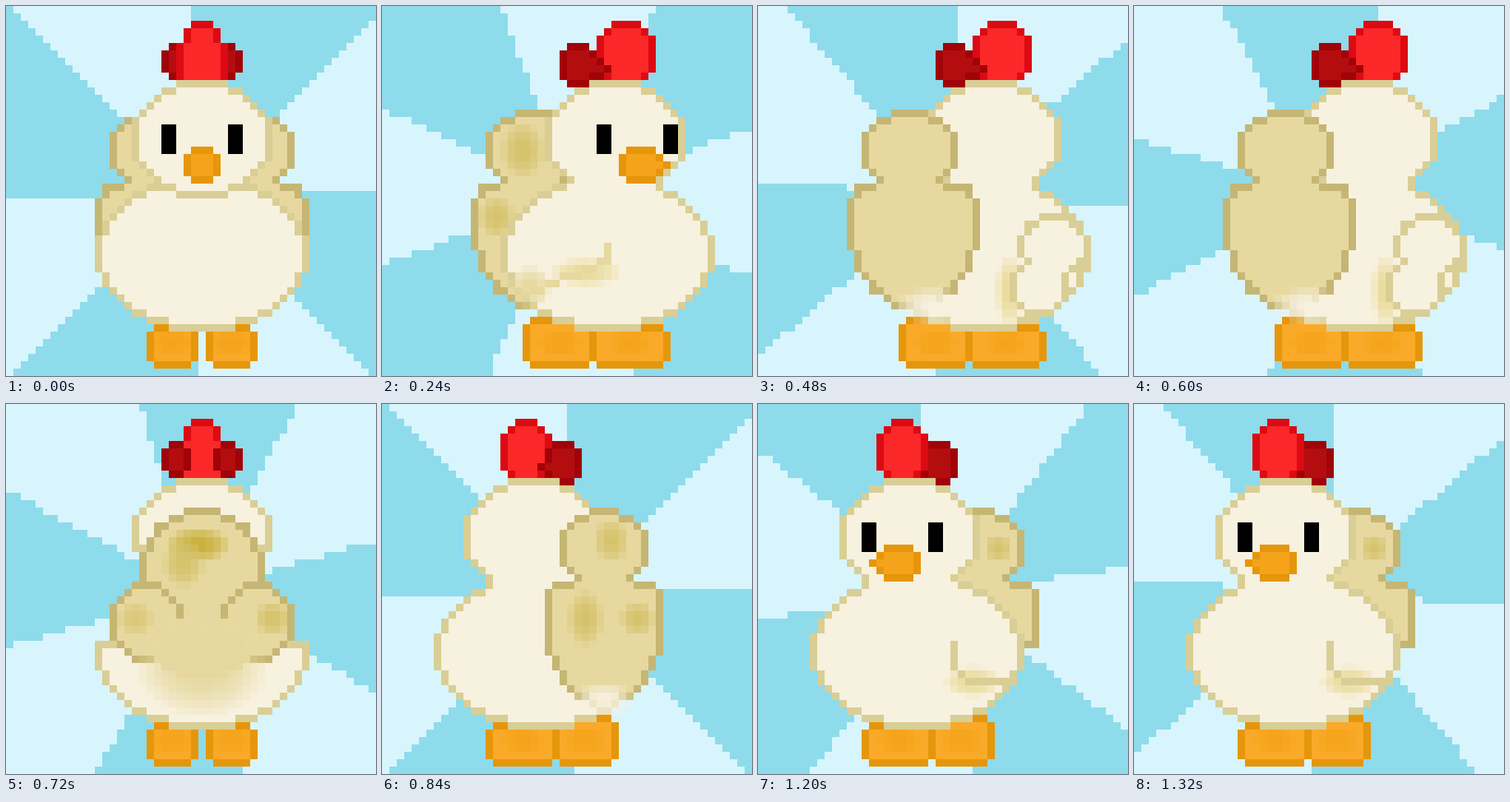
Write an HTML page with a canvas that moves like this. It is 500 px wide and 500 px high and loops after 1440 ms.

```html
<!DOCTYPE html>
<html lang="en">
<head>
<meta charset="utf-8">
<title>Turning hen</title>
<style>
html, body { margin: 0; height: 100%; overflow: hidden; }
canvas { display: block; }
</style>
</head>
<body>
<canvas width="500" height="500"></canvas>
<script>
const ctx = document.querySelector('canvas').getContext('2d');
const CELL = 10, GRID = 50, STEP = 120, STEPS = 12;
const RAY_STEPS = 7, RAY_TURN = 12.3;

const SKY = '#8edbeb', LIGHT = '#d8f5fd';
const CREAM = '#f7f1df', EDGE = '#d9ce95';
const TAN = '#e6d89f', BARK = '#c5b674';
const RED = '#fa2828', RED_EDGE = '#dc0a12', WINE = '#b40d10', WINE_EDGE = '#a00308';
const ORANGE = '#faaa28', BEAK = '#f5a31a', ORANGE_EDGE = '#e6960a';
const OCHRE = '#d6c36c', BUTTER = '#eadb98';

let flip = false;

function cell(x, y, color) {
  ctx.fillStyle = color;
  ctx.fillRect((flip ? 51 - x : x) * CELL, y * CELL, CELL, CELL);
}

// Shapes are tests on a cell. An oval fills the cells from x0,y0 to x1,y1;
// a higher power makes it boxier.
function oval(x0, y0, x1, y1, power = 2) {
  const cx = (x0 + x1) / 2, cy = (y0 + y1) / 2;
  const rx = cx - x0 + 0.5, ry = cy - y0 + 0.5;
  return (x, y) => Math.abs((x - cx) / rx) ** power + Math.abs((y - cy) / ry) ** power <= 1;
}
const any = (...shapes) => (x, y) => shapes.some(s => s(x, y));
const band = (shape, top, bottom = GRID) => (x, y) => y >= top && y <= bottom && shape(x, y);
const mirror = shape => (x, y) => shape(52 - x, y);

// Fills a shape and draws its border cells in the edge colour.
function paint(shape, fill, edge) {
  for (let y = 0; y < GRID; y++)
    for (let x = 0; x < GRID; x++) {
      if (!shape(x, y)) continue;
      const inner = shape(x - 1, y) && shape(x + 1, y) && shape(x, y - 1) && shape(x, y + 1);
      cell(x, y, inner ? fill : edge);
    }
}

// Soft elliptical patch.
function shade(cx, cy, rx, ry, color) {
  for (let y = Math.ceil(cy - ry); y <= cy + ry; y++)
    for (let x = Math.ceil(cx - rx); x <= cx + rx; x++) {
      ctx.globalAlpha = Math.max(0, 1 - ((x - cx) / rx) ** 2 - ((y - cy) / ry) ** 2);
      cell(x, y, color);
    }
  ctx.globalAlpha = 1;
}

function line(color, ...pts) {
  for (let k = 1; k < pts.length; k++) {
    const [x0, y0] = pts[k - 1], [x1, y1] = pts[k];
    const n = Math.max(Math.abs(x1 - x0), Math.abs(y1 - y0));
    for (let i = 0; i <= n; i++)
      cell(Math.round(x0 + (x1 - x0) * i / n), Math.round(y0 + (y1 - y0) * i / n), color);
  }
}

const cream = s => paint(s, CREAM, EDGE);
const tan = s => paint(s, TAN, BARK);
const red = s => paint(s, RED, RED_EDGE);
const wine = s => paint(s, WINE, WINE_EDGE);
const beak = s => paint(s, BEAK, ORANGE_EDGE);

const head = cx => oval(cx - 9, 10, cx + 9, 25);
const body = cx => oval(cx - 14, 23, cx + 14, 43);

function foot(x0, x1, top) {
  paint(oval(x0, top, x1, 48, 4), ORANGE, ORANGE_EDGE);
  shade((x0 + x1) / 2, 45, 3, 2, BEAK);
}

function eyes(...xs) {
  for (const x of xs)
    for (let i = 0; i < 8; i++) cell(x + i % 2, 16 + (i >> 1), '#000');
}

const rightRear = any(oval(14, 14, 26, 24), band(oval(12, 18, 29, 40), 24));
const leftTail = oval(24, 14, 35, 24), leftRump = oval(22, 18, 37, 40);

const rightLobe = any(oval(24, 5, 28, 10), oval(26, 7, 30, 9));
const leftLobe = any(oval(22, 5, 26, 10), oval(21, 7, 24, 9));
const middleCrest = oval(23, 2, 29, 13);
const rightCrest = oval(29, 2, 36, 10);
const leftCrest = oval(16, 2, 22, 10);
const sideLobe = oval(21, 5, 24, 9);
const sideLobes = any(sideLobe, mirror(sideLobe));

function straightFeet() {
  foot(19, 25, 43);
  foot(27, 33, 43);
}

function rightFeet() {
  foot(19, 28, 42);
  foot(28, 38, 43);
}

function leftFeet() {
  foot(23, 31, 42);
  foot(14, 23, 43);
}

function front() {
  straightFeet();
  wine(sideLobes);
  red(middleCrest);
  tan(any(rightRear, mirror(rightRear)));
  cream(body(26));
  cream(head(26));
  eyes(21, 30);
  beak(oval(24, 19, 28, 23));
}

function frontRight() {
  rightFeet();
  red(rightCrest);
  wine(rightLobe);
  tan(rightRear);
  shade(18.5, 19, 3, 4, OCHRE);
  shade(15, 28, 2.5, 3, OCHRE);
  cream(any(head(31), body(30)));
  shade(19.5, 37.5, 3, 3, TAN);
  shade(27, 35.5, 5, 2, BUTTER);
  line(TAN, [30, 32], [30, 34], [25, 36], [20, 38]);
  eyes(29, 38);
  beak(any(oval(32, 19, 37, 23), oval(36, 21, 38, 21)));
}

function backRight() {
  rightFeet();
  red(rightCrest);
  wine(rightLobe);
  cream(any(head(31), body(30)));
  shade(33.5, 38, 2, 5, BUTTER);
  cream(any(oval(35, 28, 44, 36), oval(34, 34, 41, 41)));
  tan(rightRear);
  shade(23, 40, 5, 2.5, CREAM);
}

function back() {
  const wing = oval(14, 24, 23, 34);
  straightFeet();
  red(middleCrest);
  wine(sideLobes);
  cream(band(body(26), 32));
  cream(band(head(26), 0, 19));
  tan(oval(18, 14, 34, 30));
  tan(any(wing, mirror(wing)));
  paint(oval(20, 29, 32, 36), TAN, TAN);
  shade(26, 35, 9, 7, TAN);
  shade(25.5, 18.5, 4.5, 2.5, '#c9b03c');
  shade(23.5, 21, 3, 3.5, OCHRE);
  shade(17, 28.5, 2.5, 2.5, '#dcc87a');
  shade(35.5, 28.5, 2.5, 2.5, OCHRE);
}

function backLeft() {
  leftFeet();
  red(leftCrest);
  wine(leftLobe);
  cream(any(head(20), body(21)));
  tan(any(leftTail, band(leftRump, 24)));
  shade(29.5, 39.5, 4, 2.5, CREAM);
  shade(30.5, 18, 2.5, 3, OCHRE);
  shade(27, 28.5, 2.5, 4, OCHRE);
  shade(34, 28.5, 2.5, 2.5, OCHRE);
}

function left() {
  foot(12, 22, 43);
  foot(22, 31, 43);
  wine(oval(18, 5, 22, 10));
  red(oval(11, 2, 18, 10));
  cream(any(oval(7, 10, 23, 25), oval(4, 24, 24, 39), oval(4, 23, 42, 43), oval(28, 23, 42, 41)));
  shade(40, 32, 4, 9, TAN);
  tan(oval(33, 15, 43, 25));
  shade(35, 24, 3.5, 3, CREAM);
  shade(39.5, 18, 3.5, 3, OCHRE);
  shade(21, 34, 4, 2.5, BUTTER);
  shade(27, 36.5, 5, 2, BUTTER);
  line(EDGE, [28, 27], [32, 29], [32, 33], [29, 36], [22, 35], [17, 30]);
  eyes(15);
  beak(oval(4, 18, 9, 23));
}

function right() {
  flip = true;
  left();
  flip = false;
}

function frontLeft() {
  leftFeet();
  wine(leftLobe);
  red(leftCrest);
  tan(any(leftTail, band(leftRump, 24, 32)));
  shade(32, 19, 2, 2, OCHRE);
  cream(any(head(20), body(21)));
  shade(28.5, 37, 4, 2.2, BUTTER);
  line(EDGE, [26, 32], [26, 35], [28, 37], [33, 37]);
  eyes(14, 23);
  beak(any(oval(16, 19, 21, 23), oval(15, 21, 17, 21)));
}

// Eight rays around the middle, every other one lit.
function rays(i) {
  for (let y = 0; y < GRID; y++)
    for (let x = 0; x < GRID; x++) {
      const angle = Math.atan2(25 - y, x - 25) * 180 / Math.PI;
      const a = (angle + i * RAY_TURN + 360) % 90;
      cell(x, y, a > 0.01 && a < 44.99 ? LIGHT : SKY);
    }
}

const POSES = [front, frontRight, right, backRight, back, backLeft, left, frontLeft];
let shown = -1;

function tick() {
  const i = Math.floor(performance.now() / STEP) % STEPS;
  if (i !== shown) {
    shown = i;
    rays(i % RAY_STEPS);
    POSES[Math.round(i * POSES.length / STEPS)]();
  }
  requestAnimationFrame(tick);
}
tick();
</script>
</body>
</html>
```
